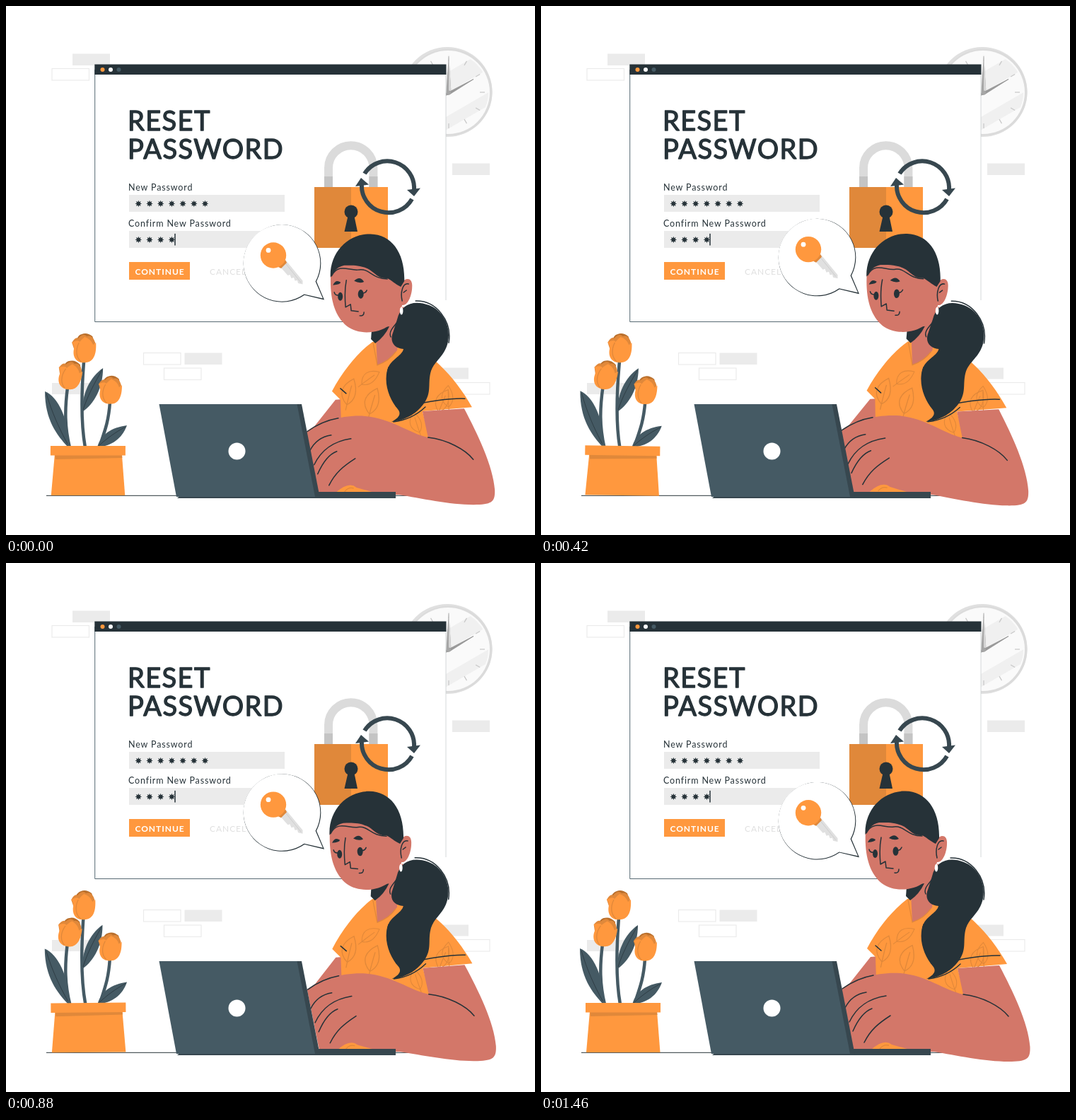
These frames come from a looping animation (748 by 748 pixels, 1500 ms). An HTML page:

```html
<!DOCTYPE html>
<html lang="en">
<head>
<meta charset="utf-8">
<title>Reset password</title>
<style>
  html, body { margin: 0; height: 100%; overflow: hidden; background: #fff; }
  svg { display: block; width: 100vw; height: 100vh; }
  text { font-family: Lato, sans-serif; fill: #263238; }
  .orange { fill: #ff983e; }
  .shade { fill: #e0883a; }
  .dark { fill: #263238; }
  .slate { fill: #455a64; }
  .deep { fill: #37474f; }
  .skin { fill: #d37769; }
  .pale { fill: #ebebeb; }
  .white { fill: #fff; }
  .box { fill: #fff; stroke: #ebebeb; stroke-width: 1.2; }
  .ink { fill: none; stroke: #263238; stroke-width: 1.5; stroke-linecap: round; stroke-linejoin: round; }
  .stem { fill: none; stroke: #455a64; stroke-width: 4.5; }
  .vein { fill: none; stroke: #263238; stroke-width: .7; }
  .print { fill: none; stroke: #e0883a; stroke-width: 1.3; }
  .title { font-size: 38px; letter-spacing: 1.4px; stroke: #263238; stroke-width: 1.3; stroke-linejoin: round; }
  .label { font-size: 12.5px; letter-spacing: .85px; }
  .button { font-size: 12px; letter-spacing: .95px; }
</style>
</head>
<body>
<svg viewBox="0 0 748 748">
  <defs>
    <path id="star" class="dark" d="M0-4.8 1-2.3 3.4-3.4 2.3-1 4.8 0 2.3 1 3.4 3.4 1 2.3 0 4.8-1 2.3-3.4 3.4-2.3 1-4.8 0-2.3-1-3.4-3.4-1-2.3Z"/>
    <g id="tulip">
      <path fill="#b96f2c" d="M-12-8Q-9-19-3-20Q4-23 12-17L15-8 0 6Z"/>
      <path class="shade" d="M-17-8Q-12-17-8-14Q-1-22 4-17Q12-20 16-8L8 16-9 16Z"/>
      <path class="orange" d="M-17-8Q-8-13-6-9Q-3-13 1-16Q10-13 13-5L17-8C18 8 14 19 3 20C-10 22-17 13-14 0Q-14-5-17-8Z"/>
      <path class="print" d="M-7-8C-13 4-10 14-4 19" stroke-width=".8"/>
    </g>
    <path id="leaf" class="print" d="M0 0C-16-12-13-26 2-38C11-22 11-9 0 0M0 8Q0-12 1-28"/>
    <clipPath id="face"><circle cx="626" cy="122" r="56"/></clipPath>
  </defs>
  <rect width="748" height="748" fill="#fff"/>

  <!-- wall and clock -->
  <g class="pale">
    <rect x="94" y="67.500" width="53" height="16.500"/>
    <rect x="631" y="222.500" width="53" height="16.500"/>
    <rect x="252.500" y="490.500" width="53" height="16.500"/>
    <rect x="65" y="533" width="53" height="16"/>
    <rect x="601" y="511.500" width="53" height="16"/>
  </g>
  <rect class="box" x="65" y="88.500" width="52.500" height="16.500"/>
  <rect class="box" x="194.500" y="490.500" width="52.500" height="16.500"/>
  <rect class="box" x="223.500" y="512" width="52.500" height="16.500"/>
  <rect class="box" x="632" y="532.500" width="52" height="16.500"/>

  <circle cx="624" cy="121.500" r="63.500" fill="#e0e0e0"/>
  <circle cx="626" cy="122" r="61.500" fill="#dbdbdb"/>
  <circle cx="625" cy="122" r="59" fill="#fafafa"/>
  <g clip-path="url(#face)" stroke="#f0f0f0">
    <path d="M575 137 690 70" stroke-width="25"/>
    <path d="M600 179 700 121" stroke-width="16"/>
  </g>
  <g id="ticks" stroke="#c7c7c7" stroke-width="1.2"></g>
  <path d="M622 127 626 69 629.500 123Z" fill="#a6a6a6"/>
  <path d="M626 69 629.500 123 626 123Z" fill="#d4d4d4"/>
  <path d="M618 126 661 103.500 627 125Z" fill="#999" stroke="#999"/>
  <circle cx="626" cy="122.500" r="3" fill="#a6a6a6"/>

  <!-- window -->
  <path class="white" d="M125.500 83H622V446.500H125.500Z"/>
  <path d="M622 97V416" stroke="#c9ced0" stroke-width=".8"/>
  <path d="M125.700 90V446.500H480" fill="none" stroke="#455a64" stroke-width=".9"/>
  <path class="dark" d="M125.300 82.500H622.500V97H125.300Z"/>
  <circle class="orange" cx="136.500" cy="90" r="3"/>
  <circle class="white" cx="148" cy="90" r="3"/>
  <circle class="slate" cx="159.500" cy="90" r="3"/>

  <text class="title" x="172" y="176">RESET</text>
  <text class="title" x="172" y="215.500">PASSWORD</text>
  <text class="label" x="173" y="261">New Password</text>
  <text class="label" x="173" y="312">Confirm New Password</text>
  <path class="pale" d="M174 267H394V291H174ZM174 318H394V342H174Z"/>
  <g id="stars"></g>
  <path class="ink" d="M239 322.500V338" stroke-width="1"/>
  <rect class="orange" x="174" y="362" width="86" height="25"/>
  <text class="button" x="182.500" y="380" style="fill:#fff;font-weight:700">CONTINUE</text>
  <text class="button" x="288" y="380" style="fill:#e0e0e0">CANCEL</text>

  <!-- padlock -->
  <path d="M456 256V229A31.700 31.700 0 0 1 519.400 229V256" fill="none" stroke="#dbdbdb" stroke-width="12"/>
  <path d="M450 241H462V256H450ZM513.400 241H525.400V256H513.400Z" fill="#c4c4c4"/>
  <rect class="orange" x="436" y="256" width="104" height="86"/>
  <rect class="shade" x="436" y="256" width="52" height="86"/>
  <circle class="dark" cx="488" cy="291" r="9.500"/>
  <path class="dark" d="M484 295H492L497 319H478.500Z"/>
  <path d="M507 237A38 38 0 0 1 577 260M574 273A38 38 0 0 1 503 252" fill="none" stroke="#37474f" stroke-width="6"/>
  <path class="deep" d="M567 260 586 257.500 577 269ZM494 255 502 243 513 252.500Z"/>

  <!-- speech bubble with key -->
  <g id="bubble">
    <path class="dark" d="M422 408.800 450 415.500 439 389.500A54.800 54.800 0 1 0 422 408.800Z"/>
    <path class="white" d="M421.500 407.600 448 413.500 437.600 389.500A54.300 54.300 0 1 0 421.500 407.600Z"/>
    <path d="M387 368 396 360 419.500 388.500V393.500L413 392 412 388 408.500 388.500 407 384 403.500 385 401.500 380 398.500 381Z" fill="#e0e0e0"/>
    <path d="M394 362.500 417 391" stroke="#c9c9c9" stroke-width=".8"/>
    <path class="shade" d="M385 369 395 359 397 363 389 371Z"/>
    <circle class="orange" cx="378" cy="352.500" r="18.200"/>
    <circle class="white" cx="371" cy="345.500" r="3.400"/>
  </g>

  <path d="M57 692.300H571" stroke="#263238"/>

  <!-- plant -->
  <g id="plant">
    <path class="stem" d="M112 624C105 585 107 540 110 502M90 624C83 595 83 570 87 539M132 624C140 600 145 588 147 560"/>
    <g class="slate">
      <path d="M55 545C73 552 90 585 88 624C72 607 55 585 55 545Z"/>
      <path d="M137 512C137 540 125 562 108 574C107 550 118 525 137 512Z"/>
      <path d="M171 593C164 612 150 622 129 624C134 606 149 596 171 593Z"/>
    </g>
    <path class="vein" d="M57 548C65 575 75 597 87 619M136 514C124 535 115 552 109 571M169 595C154 603 142 612 131 622"/>
    <use href="#tulip" x="110" y="484"/>
    <use href="#tulip" transform="translate(90 522)rotate(10)"/>
    <use href="#tulip" transform="translate(147 543)rotate(3)scale(.97)"/>
    <path class="orange" d="M69 634H164L168.500 692H64Z"/>
    <path class="shade" d="M69 634H164L164.500 639 70 641Z"/>
    <rect class="orange" x="63" y="622" width="106" height="13.500"/>
  </g>

  <!-- woman -->
  <g id="woman">
    <path class="skin" d="M466 557 478 556V592L428 605Z"/>
    <path class="orange" d="M518 475C495 492 474 520 461 545L473 557 474 590 600 615 589 573 659 567C645 542 626 518 607 502L560 468Z"/>
    <use href="#leaf" transform="translate(482 564)rotate(12)"/>
    <use href="#leaf" transform="translate(514 577)rotate(14)"/>
    <use href="#leaf" transform="translate(503 535)rotate(52)scale(.8)"/>
    <use href="#leaf" transform="translate(612 574)rotate(20)scale(.9)"/>
    <use href="#leaf" transform="translate(626 567)rotate(-4)scale(.8)"/>
    <use href="#leaf" transform="translate(585 603)rotate(-20)scale(.8)"/>
    <path class="ink" d="M473 541 481 548M566 566Q620 554 649 555"/>
    <path class="skin" d="M523 468 525 508Q542 502 553 487L562 425 530 440Z"/>
    <path class="print" d="M519 476 525 508Q542 502 551 489" stroke-width=".7"/>
    <path class="dark" d="M517 457 516 471 522 477Q535 468 542 453Z"/>

    <path class="dark" d="M553 443C558 421 577 415 598 423C619 431 629 455 625 474C621 495 606 501 601 516C596 533 602 544 593 559C583 575 566 586 545 588C555 583 560 577 554 570C543 557 534 536 539 515C543 500 560 495 562 485C549 484 542 475 547 462Z"/>
    <path class="ink" d="M544 468C539 458 555 449 560 436M579 417C608 416 631 445 626 476M541 511C534 535 545 555 552 566M548 588Q574 585 593 567" stroke-width="1.100"/>
    <path class="skin" d="M459 377C457 413 464 438 482 453C499 466 527 463 541 452C551 444 558 433 560 423C569 424 574 407 574 397C575 384 565 383 560 391L535 351 478 352Z"/>
    <path class="dark" d="M458.500 384C457 348 484 322 515 322.500C545 323 564 349 563 389L558 397C550 393 545 388 539 385C527 386 523 379 514 373C501 366 489 367 478 367C468 369 464 375 458.500 384Z"/>
    <path class="ink" d="M460 382C470 362 487 376 499 373C514 371 517 386 539 386M569 393C561 391 557 404 560 417M562 405 566 402" stroke-width="1.100"/>
    <ellipse class="white" cx="559" cy="431" rx="2.300" ry="5.500"/>
    <g class="dark">
      <ellipse cx="472.500" cy="411" rx="3.500" ry="6"/>
      <ellipse cx="501.500" cy="407.500" rx="4" ry="6.300"/>
      <path d="M462 395Q466 386 473 391Q473 394 462 395ZM492 389Q500 381 506 390Q500 393 492 389Z"/>
    </g>
    <path class="ink" d="M464 405Q465 410 471 409M503 406Q508 407 510 402M481 388C478 403 479 415 480 426L487 422 488 431 498 432M500 438Q506 439 506 433"/>

    <path class="skin" d="M425 602C445 587 478 578 508 580C545 583 570 604 597 610L589 573 648 569C667 605 689 650 691.500 684C692 701 688 705 661 705C628 705 586 696 556 691L442 690Z"/>
    <path class="orange" d="M467 688Q485 672 496 681L521 688Z"/>
    <path class="print" d="M479 687Q484 680 492 682" stroke-width=".8"/>
    <path class="ink" d="M426 602Q447 587 470 583M597 610C624 613 650 627 661 641M430 629C437 615 447 609 460 607M436 649C446 628 462 616 488 612M441 662C448 646 457 634 468 630M457 678C466 660 477 651 494 640"/>
  </g>

  <!-- laptop -->
  <path class="deep" d="M436 687H551V696H242Z"/>
  <path class="deep" d="M405 563H418L444 696H242Z"/>
  <path class="slate" d="M216.500 563H411.500L437 694H241Z"/>
  <ellipse class="white" cx="326.500" cy="629.500" rx="12" ry="12"/>
</svg>
<script>
  const byId = id => document.getElementById(id);
  const repeat = (count, make) => Array.from({ length: count }, (_, i) => make(i)).join('');

  byId('ticks').innerHTML = repeat(12, i =>
    `<path d="M626 71V78" transform="rotate(${i * 30} 626 122)"/>`);
  const starRow = (count, y) => repeat(count, i =>
    `<use href="#star" x="${187.3 + i * 15.7}" y="${y}"/>`);
  byId('stars').innerHTML = starRow(7, 279.5) + starRow(4, 330.5);

  const LOOP = 1500, STEPS = 36;
  const place = (id, transform) => byId(id).setAttribute('transform', transform);

  function draw(now) {
    // The loop advances in 24 poses per second.
    const step = Math.floor((now % LOOP + 5) / LOOP * STEPS) + 1;
    const phase = step / STEPS % 1;
    const lift = 15 * (1 - Math.abs(1 - 2 * phase));
    const sway = phase < .25 ? 4 * phase : phase < .75 ? 2 - 4 * phase : 4 * phase - 4;
    place('bubble', `translate(0 ${.8 - lift})`);
    place('plant', `rotate(${sway} 112 578)`);
    place('woman', `rotate(${sway} 560 513)`);
  }

  function tick() {
    draw(performance.now());
    requestAnimationFrame(tick);
  }
  tick();
</script>
</body>
</html>
```
